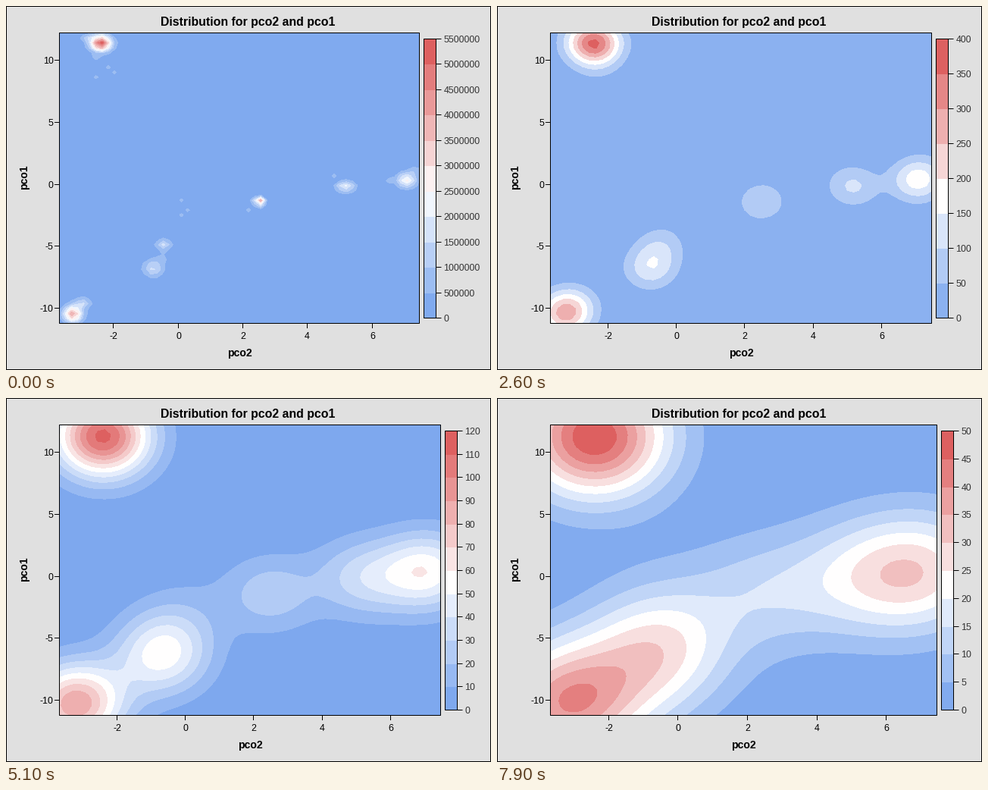
Write a matplotlib script that moves like this. It is 640 px wide and 480 px high and loops after 8 s.

```python
import numpy as np
import matplotlib.pyplot as plt
from matplotlib.animation import FuncAnimation
from matplotlib.colors import LinearSegmentedColormap
from matplotlib.patches import Rectangle

plt.rcParams["font.family"] = "Liberation Sans"

FRAMES, GRID, DPI = 80, 60, 100
W, H = 640, 480
X0, X1, Y0, Y1 = -3.673, 7.456, -11.22, 12.2
LEFT, TOP, BOTTOM = 70.5, 35.5, 418.5
BAR_TOP, BAR_BOTTOM = 43.5, 411.5
BW_X, BW_Y, BW_MIN, SCALE = 0.0183, 0.0424, 0.081, 29.1
HALO, SPREAD = 0.15, 1.9

# sample clusters in grid cells: column, row, mass, width, height
CLUSTERS = [
    (6.8, 56.9, 48, 1.12, 1.02), (4.5, 58, 2.2, 0.7, 0.4),
    (2.2, 1.9, 34, 1.0, 1.1), (3.9, 4.2, 7, 0.9, 0.7),
    (15.4, 11.2, 18, 1.15, 1.2), (17, 13.4, 2, 0.7, 0.6),
    (17.1, 16, 8.5, 0.85, 0.75),
    (32.8, 24.8, 11, 0.57, 0.57),
    (46.9, 27.8, 14, 1.1, 0.75),
    (56.9, 29.1, 22.5, 1.1, 1.0), (58.5, 31.2, 2.5, 0.7, 0.6),
]
SPECKS = [(8, 52), (6, 54), (9, 51), (6, 50), (20, 25), (21, 23), (20, 22),
          (31, 23), (45, 30), (54, 29)]

cell = np.arange(GRID)


def blob(col, row, mass, sx, sy):
    b = np.outer(np.exp(-0.5 * ((cell - row) / sy) ** 2),
                 np.exp(-0.5 * ((cell - col) / sx) ** 2))
    return mass * b / b.sum()


def cluster(col, row, mass, sx, sy):
    """Dense core with a wider, fainter halo."""
    return (blob(col, row, mass * (1 - HALO), sx, sy)
            + blob(col, row, mass * HALO, sx * SPREAD, sy * SPREAD))


bins = sum(cluster(*c) for c in CLUSTERS)
for col, row in SPECKS:
    bins[row, col] += 0.8

ramp = LinearSegmentedColormap.from_list("ramp", ["#6497EB", "#FFFFFF", "#DD6060"])
gx = np.linspace(X0, X1, GRID)
gy = np.linspace(Y0, Y1, GRID)


def kernel(g, h):
    return np.exp(-0.5 * ((g[:, None] - g[None, :]) / h) ** 2)


def density(n):
    """Gaussian density estimate whose bandwidth grows with n."""
    m = max(n, BW_MIN)
    hx, hy = BW_X * m, BW_Y * m
    return SCALE / (2 * np.pi * hx * hy) * (kernel(gy, hy) @ bins @ kernel(gx, hx))


def nice_step(peak):
    raw = peak / 10
    base = 10 ** np.floor(np.log10(raw))
    f = raw / base
    return base * (1 if f < 2 ** 0.5 else 2 if f < 10 ** 0.5 else 5 if f < 50 ** 0.5 else 10)


def px(size):
    return size * 72 / DPI


fig = plt.figure(figsize=(W / DPI, H / DPI), dpi=DPI, facecolor="#E0E0E0")
ax = fig.add_axes([0, 0, 1, 1])
ax.axis("off")
ax.set(xlim=(0, W), ylim=(H, 0), autoscale_on=False)


def text(x, y, s, size=12.4, **kw):
    return ax.text(x, y, s, fontsize=px(size), **kw)


def line(x0, y0, x1, y1):
    return ax.plot([x0, x1], [y0, y1], color="black", lw=px(1), zorder=5,
                   solid_capstyle="butt", snap=False)[0]


def add_rect(x0, y0, x1, y1, **kw):
    return ax.add_patch(Rectangle((x0, y0), x1 - x0, y1 - y0, snap=False, **kw))


def outline(*corners):
    return add_rect(*corners, fill=False, ec="black", lw=px(1), zorder=5)


def fill(*corners, color):
    return add_rect(*corners, fc=color, ec="none", antialiased=False, zorder=1)


def y_pix(v):
    return BOTTOM - (v - Y0) / (Y1 - Y0) * (BOTTOM - TOP)


outline(0.5, 0.5, W - 0.5, H - 0.5)
text(319, 26, "Distribution for pco2 and pco1", 15.85, weight="bold", ha="center")
text(24.5, 225.5, "pco1", 14, weight="bold", rotation=90, ha="center", va="center")
for v in range(-10, 11, 5):
    y = np.floor(y_pix(v)) + 0.5
    line(64, y, 70, y)
    text(62.5, y + 4.5, str(v), ha="right")

moving = []


def draw(n):
    while moving:
        moving.pop().remove()

    z = density(n)
    step = nice_step(z.max())
    count = int(np.ceil(z.max() / step))
    colors = [ramp((b + 1) / count) for b in range(count)]
    digits = len(str(round(step * count)))
    right = 594.5 - 7 * digits

    def x_pix(v):
        return LEFT + (v - X0) / (X1 - X0) * (right - LEFT)

    moving.append(fill(LEFT, TOP, right, BOTTOM, color=colors[0]))
    moving.append(ax.contourf(x_pix(gx), y_pix(gy), z, step * np.arange(1, count + 1),
                              colors=colors[1:], antialiased=False, zorder=2))
    moving.append(outline(LEFT, TOP, right, BOTTOM))

    for v in range(-2, 7, 2):
        x = np.floor(x_pix(v)) + 0.5
        moving.append(line(x, 419, x, 425))
        moving.append(text(x, 439, str(v), ha="center"))
    moving.append(text((LEFT + right) / 2, 462, "pco2", 14, weight="bold", ha="center"))

    # colour legend
    bar, edge = right + 6, right + 22
    tall = (BAR_BOTTOM - BAR_TOP) / count
    for b in range(count + 1):
        y = BAR_BOTTOM - b * tall
        if b < count:
            moving.append(fill(bar, y - tall, edge, y, color=colors[b]))
        tick = np.floor(y) + 0.5
        moving.append(line(edge, tick, edge + 7, tick))
        moving.append(text(right + 32, tick + 4.5, str(round(b * step)), color="#333333"))
    moving.append(outline(bar, BAR_TOP, edge, BAR_BOTTOM))
    return moving


anim = FuncAnimation(fig, draw, frames=FRAMES, interval=100, repeat=True,
                     repeat_delay=0, blit=False)
plt.show()
```
